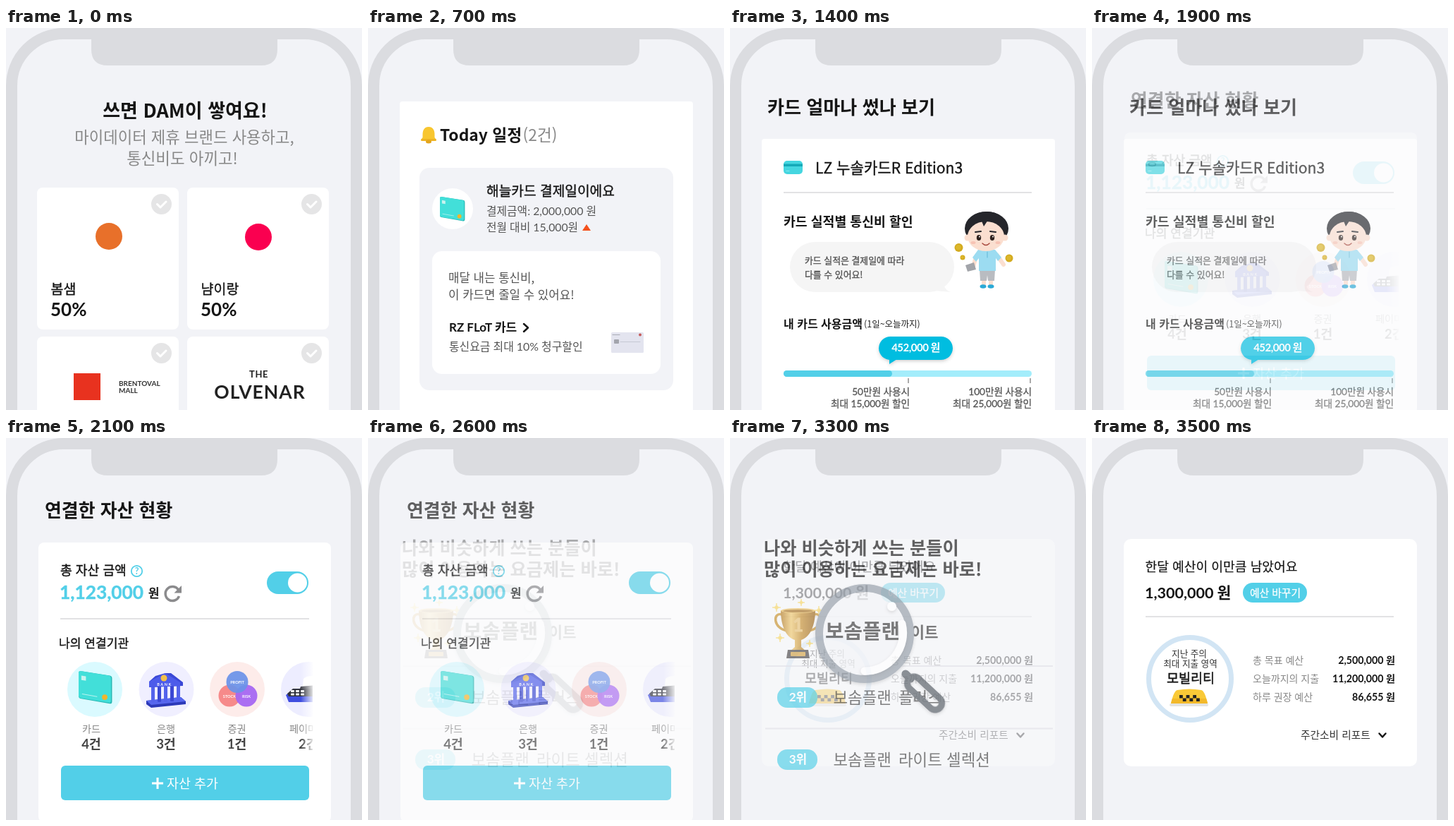
Animation, 505 px wide and 541 px high, one loop 4000 ms. Source, as an HTML page:

```html
<!DOCTYPE html>
<html lang="ko">
<head>
<meta charset="utf-8">
<title>Phone screens</title>
<style>
html, body { margin: 0; width: 100%; height: 100%; overflow: hidden; background: #f2f3f7; }
svg { display: block; width: 100%; height: 100%; }
text { font-family: 'Noto Sans CJK KR', 'Noto Sans CJK JP', 'Noto Sans CJK', sans-serif; white-space: pre; }
.lato { font-family: Lato, 'Noto Sans CJK KR', 'Noto Sans CJK JP', sans-serif; }
</style>
</head>
<body>
<svg id="stage" viewBox="0 0 505 541" xmlns="http://www.w3.org/2000/svg"></svg>
<script>
const BG = '#f2f3f7', CYAN = '#52cfe8', INK = '#151515', GRAY = '#888', DARK = '#555';

// Basic shapes
const rect = (x, y, w, h, r, fill, extra = '') =>
  `<rect x="${x}" y="${y}" width="${w}" height="${h}" rx="${r}" fill="${fill}" ${extra}/>`;
const disc = (x, y, r, fill, extra = '') =>
  `<circle cx="${x}" cy="${y}" r="${r}" fill="${fill}" ${extra}/>`;
const oval = (x, y, rx, ry, fill) =>
  `<ellipse cx="${x}" cy="${y}" rx="${rx}" ry="${ry}" fill="${fill}"/>`;
const path = (d, fill, extra = '') => `<path d="${d}" fill="${fill}" ${extra}/>`;
const line = (d, color, width, cap = 'round') =>
  path(d, 'none', `stroke="${color}" stroke-width="${width}" stroke-linecap="${cap}" stroke-linejoin="round"`);
const rule = (x1, x2, y, color = '#e2e2e4') => rect(x1, y - 1, x2 - x1, 2, 0, color);

// Text: anchor s/m/e, "mid" thickens the regular weight slightly
function text(x, y, str, size, fill = INK, { bold, mid, lato, a = 's', ls = 0 } = {}) {
  const anchor = { s: 'start', m: 'middle', e: 'end' }[a];
  const thick = mid ? ` stroke="${fill}" stroke-width="${mid}"` : '';
  return `<text x="${x}" y="${y}" font-size="${size}" fill="${fill}" text-anchor="${anchor}"` +
    ` font-weight="${bold ? 700 : 400}" letter-spacing="${ls}"${lato ? ' class="lato"' : ''}${thick}>${str}</text>`;
}
const bold = { bold: 1 }, mid = { mid: .35 }, lato = { lato: 1 }, latoBold = { lato: 1, bold: 1 };

const at = (x, y, s, body) => `<g transform="translate(${x} ${y}) scale(${s})">${body}</g>`;

const payCard = (x, y, s) => at(x, y, s,
  path('M2 0L34 5Q36.500 5.300 36.500 8V33Q36.500 36 34 35.500L2 30Q0 29.600 0 27V2Q0 0 2 0Z', '#2ab8b4') +
  path('M2 0L33 5Q35.300 5.300 35.300 8V32Q35.300 35 33 34.500L2 29.500Q0 29 0 27V2Q0 0 2 0Z', '#42dfd9') +
  path('M3 5L8 5.800V10.500L3 9.800Z', '#c9f3ef') +
  line('M4 25L20 27.800', '#b9f3ef', .8) +
  disc(28.500, 28.500, 3, '#f0b52c'));

function shopTile(x, y, name = '') {
  const cx = x + 176.500, cy = y + 23.500;
  let s = rect(x, y, 201, 201, 8, '#fff') + disc(cx, cy, 14.500, '#e5e5e6') +
    line(`M${cx - 6} ${cy}l4.500 4.500l8 -8`, '#fff', 3);
  if (name) s += text(x + 19.500, y + 151, name, 19.500, INK, mid) +
    text(x + 19, y + 182, '50%', 26, INK, latoBold);
  return s;
}

function shops() {
  return text(254, 126.500, '쓰면 DAM이 쌓여요!', 27, INK, { bold: 1, a: 'm' }) +
    text(253, 162.500, '마이데이터 제휴 브랜드 사용하고,', 22.250, GRAY, { a: 'm' }) +
    text(250, 192.500, '통신비도 아끼고!', 22.400, GRAY, { a: 'm' }) +
    shopTile(44, 226, '봄샘') + shopTile(257, 226, '냠이랑') +
    shopTile(44, 437) + shopTile(257, 437) +
    disc(146, 295, 19, '#e8702a') + disc(358, 296, 19, '#fa0050') +
    rect(96, 489, 38, 38, 0, '#e8321f') +
    text(160, 507, 'BRENTOVAL', 10, '#333', latoBold) +
    text(160, 517, 'MALL', 10, '#333', latoBold) +
    text(358.500, 495, 'THE', 13, '#222', { ...latoBold, a: 'm', ls: .5 }) +
    text(360, 525, 'OLVENAR', 26.500, '#222', { ...latoBold, a: 'm', ls: 1 });
}

function schedule() {
  const bell = path('M86 140C79 140 77.500 146 77.500 151V155L75 158.500H97L94.500 155V151C94.500 146 93 140 86 140Z', '#f8c62f') +
    rect(75, 157, 22, 3, 1.500, '#eeb423') + oval(86, 161, 4, 2.500, '#e3a51c');
  return rect(45, 104, 416, 460, 4, '#fff') + bell +
    text(102, 160, 'Today 일정', 22.800, INK, bold) +
    text(219.500, 160, '(2건)', 22.800, GRAY) +
    rect(73, 198, 360, 315, 14, BG) + disc(120, 256, 29, '#fff') + payCard(102, 239, .97) +
    text(168, 238, '해늘카드 결제일이에요', 19.200, INK, mid) +
    text(168, 265, '결제금액: 2,000,000 원', 15.800, DARK, lato) +
    text(168, 288, '전월 대비 15,000원', 15.800, DARK, lato) +
    path('M304 287H316L310 278Z', '#f4511e') +
    rect(91, 316, 324, 174, 14, '#fff') +
    text(114, 360, '매달 내는 통신비,', 16.800, DARK) +
    text(114, 384, '이 카드면 줄일 수 있어요!', 16.800, DARK) +
    text(115, 430, 'RZ FLoT 카드', 17, INK, latoBold) +
    line('M221 419L227 424.500L221 430', INK, 2.500) +
    text(115, 457, '통신요금 최대 10% 청구할인', 15.900, DARK, lato) +
    rect(345, 431, 46, 29, 1.500, '#e3e4ef') + rect(349, 441, 7, 6, 1, '#a3a5ad') +
    line('M347 434.500H357', '#a9abb5', 1.200) + line('M358 444.500H386', '#c6c8d4', 1) +
    disc(386, 434.500, 2, '#c65a5a');
}

function boy() {
  const skin = '#fbdfd0', hair = '#25262b', shirt = '#9cdcf1';
  const coin = (x, y, r) => disc(x, y, r, '#d3ab1f') + disc(x - .5, y - .5, r * .6, '#dcb72c');
  return coin(324.500, 311, 6) + coin(330, 325, 3.500) + coin(396, 326, 5.500) +
    line('M349 324L345 338', skin, 6) + line('M379 322L388 335', skin, 6) +
    line('M360 354V364M370 354V364', skin, 6) +
    oval(359, 366, 4.500, 2.800, '#2ba9d6') + oval(370, 366, 4.500, 2.800, '#2ba9d6') +
    path('M354 342H376L375 358H366L365 350L364 358H355Z', '#b9bcc1') +
    path('M352 314H376L385 325L380 330L377 326V344H353V326L349 331L344 325Z', shirt) +
    line('M365 317V325', '#6bbddb', 1.200) +
    path('M334 336L346 332L349 342L337 345Z', '#a2a4a9') +
    oval(364, 284, 31, 24, hair) +
    disc(337, 297, 4.500, skin) + disc(390, 297, 4.500, skin) +
    oval(363, 295, 26, 21, skin) +
    path('M336 293C337 276 344 271 356 271L360 281L366 272C380 270 390 279 391 294C396 275 384 260 365 260C345 260 331 272 336 293Z', hair) +
    line('M348 289L356 288M369 288L377 289', hair, 2) +
    oval(353, 297, 3.200, 4, '#30231f') + oval(372, 297, 3.200, 4, '#30231f') +
    disc(354, 295.500, 1, '#fff') + disc(373, 295.500, 1, '#fff') +
    oval(345, 304, 3.500, 2, '#f7c3b4') + oval(380, 304, 3.500, 2, '#f7c3b4') +
    line('M358 305Q363 310 368 305', '#a8483d', 1.500);
}

function spending() {
  const goal = (x, y1, y2) => rect(x, 496, 2, 7, 0, '#aaa') +
    text(x + 3, 520, y1, 13.600, DARK, { lato: 1, a: 'e', mid: .3 }) +
    text(x + 3, 537, y2, 13.600, DARK, { lato: 1, a: 'e', mid: .3 });
  return text(53, 122, '카드 얼마나 썼나 보기', 26.100, INK, bold) +
    rect(45, 157, 416, 400, 4, '#fff') +
    rect(76, 188, 27, 19, 5, '#45d6e0') + rect(76, 192.500, 27, 3.500, 0, '#14a9b8') +
    line('M80 202.500H84', '#8ceaf0', 1.200) +
    text(121, 205.500, 'LZ 누솔카드R Edition3', 21.100, INK, mid) +
    rule(76, 428, 233) +
    text(76, 281, '카드 실적별 통신비 할인', 18.300, INK, bold) +
    rect(85, 303, 233, 71, 35.500, '#f5f5f5') + path('M290 372L304 366Q306 371 313 374Z', '#f5f5f5') +
    text(106, 334, '카드 실적은 결제일에 따라', 12.900, DARK, mid) +
    text(106, 354, '다를 수 있어요!', 12.900, DARK, mid) + boy() +
    text(76, 425, '내 카드 사용금액', 16, INK, bold) +
    text(190, 424, '(1일~오늘까지)', 12.500, '#222') +
    `<g filter="url(#soft)">${rect(211, 437, 105, 33, 16.500, '#06bde0')}${path('M226 466V476L237 469Z', '#06bde0')}</g>` +
    text(263.500, 458, '452,000 원', 15, '#fff', { ...latoBold, a: 'm', ls: -.5 }) +
    rect(76, 485, 352, 9, 4.500, '#a3edfb') +
    path('M80.500 485H225.500A4.500 4.500 0 0 1 225.500 494H80.500A4.500 4.500 0 0 1 80.500 485Z', CYAN) +
    goal(252, '50만원 사용시', '최대 15,000원 할인') +
    goal(425, '100만원 사용시', '최대 25,000원 할인');
}

function bank() {
  let s = path('M199 372L248 367L255 373V377L206 382L199 377Z', '#2c39b8') +
    path('M199 372L248 367L255 373L206 378Z', '#5767ee');
  for (let i = 0; i < 5; i++) s += rect(206 + i * 9, 351 - i * .3, 5, 23, 1, i % 2 ? '#3b48d4' : '#5463ec');
  return s + path('M203 345L212 337L226 333H234L251 346V351L203 353Z', '#3a48d6') +
    path('M203 345L226 333L247 346L247 351L203 353Z', '#4d5cea') +
    disc(224, 340, 4.500, '#f2c14a') +
    text(225, 351, 'BANK', 5.500, '#fff', { ...latoBold, a: 'm', ls: 1.500 });
}

function venn() {
  return [[317, 365, '#f58282', 'STOCK'], [341, 365, '#a565f2', 'RISK'], [328, 345.500, '#6a92e8', 'PROFIT']]
    .map(([x, y, c, s]) => disc(x, y, 15.500, c, 'fill-opacity=".93"') +
      text(x, y + 2.500, s, 5.600, '#fff', { ...latoBold, a: 'm' })).join('');
}

function terminal() {
  let s = path('M422 341Q429 335 440 338V362H420Z', '#fff') +
    path('M418 352L440 350V364H414Z', '#42434c') +
    path('M397 364L407 356H440V374H401Z', '#3f4ee0') + path('M399 362L407 355H440V366H401Z', '#30323c');
  for (let i = 0; i < 6; i++) s += rect(404 + i % 3 * 7, 357 + (i > 2) * 4.500, 5, 3, .8, '#f2f2f6');
  return s;
}

function assets() {
  const org = (x, color, art, name, count) => disc(x, 356, 39, color) + art +
    text(x - .5, 417, name, 14.200, GRAY, { a: 'm' }) +
    text(x - .5, 440, count, 18.500, '#444', { ...latoBold, a: 'm' });
  return text(55, 112, '연결한 자산 현황', 25.900, INK, bold) +
    rect(46, 148, 415, 396, 8, '#fff') +
    text(77, 194, '총 자산 금액', 18.200, INK, mid) +
    disc(185.500, 188.500, 7.700, 'none', `stroke="${CYAN}" stroke-width="1.800"`) +
    text(185.500, 193, '?', 12.500, CYAN, { ...latoBold, a: 'm' }) +
    text(76, 228, '1,123,000', 26.300, CYAN, { ...latoBold, mid: .4 }) +
    text(202, 226, '원', 17, INK, { mid: .6 }) +
    line('M244.500 215A10 10 0 1 0 245.500 224', '#8b8b8d', 3.500, 'butt') +
    path('M249 209V219.500H238.500Z', '#8b8b8d') +
    rect(370, 189, 59, 32, 16, CYAN) + disc(413.500, 205, 13.500, '#fff') +
    rule(77, 430, 256) +
    text(75, 297, '나의 연결기관', 17.100, INK, mid) +
    '<g clip-path="url(#list)">' +
    org(126, '#dafaff', payCard(103, 330, 1.300), '', '') +
    text(121, 417, '카드', 14.200, GRAY, { a: 'm' }) +
    text(121, 440, '4건', 18.500, '#444', { ...latoBold, a: 'm' }) +
    org(227.500, '#f0efff', bank(), '은행', '3건') +
    org(328, '#fdecea', venn(), '증권', '1건') +
    org(429, '#ededff', terminal(), '', '') +
    text(402, 417, '페이머니', 14.200, GRAY) + text(415, 440, '2건', 18.500, '#444', latoBold) +
    rect(418, 312, 20, 136, 0, 'url(#fade)') + '</g>' +
    rect(78, 464, 352, 49, 6, CYAN) +
    line('M207 489H223M215 481V497', '#fff', 3, 'butt') +
    text(228, 496, '자산 추가', 18.400, '#fff');
}

function trophy() {
  const star = (x, y, r) => path(`M${x} ${y - r}Q${x} ${y} ${x + r} ${y}Q${x} ${y} ${x} ${y + r}` +
    `Q${x} ${y} ${x - r} ${y}Q${x} ${y} ${x} ${y - r}Z`, '#f7d768', 'stroke="#f7d768" stroke-width=".8"');
  return line('M74 250C60 246 61 270 81 273M119 250C133 246 132 270 112 273', '#c8932f', 3.500) +
    path('M72 244H121C121 268 112 283 101 286V296L108 302H85L92 296V286C81 283 72 268 72 244Z', 'url(#gold)') +
    oval(96.500, 244.500, 24.500, 3.500, '#e9bf62') + oval(96.500, 245, 21, 2, '#a87425') +
    text(96.500, 274, '1', 26, '#e8c277', { ...latoBold, a: 'm', mid: .8 }) +
    path('M82 300H111L113 312H80Z', '#4d4a4a') + rect(86, 303, 21, 6, 1, '#d6a648') +
    star(66, 240, 6) + star(101, 233, 5) + star(126, 244, 6) + star(71, 283, 6) + star(113, 291, 5);
}

function plans() {
  const row = (y, rank, plan) => rect(67, y, 57, 29, 14, CYAN) +
    text(96.500, y + 20, rank, 17, '#fff', { ...latoBold, a: 'm' }) +
    text(146.500, y + 23, '보솜플랜', 22.400, '#444') + text(239, y + 23, plan, 22.400, '#444');
  const lens = disc(191, 277, 64.500, '#f4f5f8', 'stroke="#959ea8" stroke-width="11"');
  const handle = line('M249 334L256 341', '#555b64', 11) +
    `<g transform="translate(276 361.500) rotate(43)">` +
    rect(-30, -9.500, 60, 19, 9.500, 'none', 'stroke="#555b64" stroke-width="9"') + '</g>';
  return text(48, 165, '나와 비슷하게 쓰는 분들이', 25.250, INK, bold) +
    text(48, 194.500, '많이 이용하는 요금제는 바로!', 25.250, INK, bold) +
    rule(50, 458, 323, '#e1e2e7') + rule(50, 458, 411.500, '#e1e2e7') +
    text(237, 283, '라이트', 21.200, '#3c3c3c', bold) +
    row(353, '2위', '플러스') + row(441, '3위', '라이트 셀렉션') + trophy() +
    `<g filter="url(#soft)">${lens}${handle}</g>` +
    text(135, 284, '보솜플랜', 28.800, '#3c3c3c', bold) +
    `<g filter="url(#soft)">${line('M244 263A54 54 0 0 1 191 330', '#fff', 11)}${disc(229.500, 238.500, 6.500, '#fff')}</g>`;
}

function budget() {
  const row = (y, name, sum) => text(228, y, name, 14, GRAY) +
    text(430, y, sum, 14.200, INK, { ...latoBold, a: 'e' });
  let taxi = rect(110, 376, 55, 4, 2, '#e4e4e2') +
    path('M121 357Q138 354 155 357Q160 358 164 376H112Q116 358 121 357Z', '#f9c937') +
    path('M112 376Q113 371 114 369H162Q163 371 164 376Z', '#f3b92a');
  for (let i = 0; i < 12; i++)
    if ((i % 6 + (i > 5)) % 2 === 0) taxi += rect(124 + i % 6 * 4.800, 364 + (i > 5) * 4.500, 4.800, 4.500, 0, '#222');
  return rect(45, 143, 416, 322, 10, '#fff') +
    text(75.500, 189, '한달 예산이 이만큼 남았어요', 18.200, INK, { mid: .2 }) +
    text(75, 227, '1,300,000 원', 21.500, INK, latoBold) +
    rect(214, 205, 91, 28, 14, CYAN) +
    text(260, 225, '예산 바꾸기', 14.800, '#fff', { a: 'm', mid: .25 }) +
    rule(76, 428, 253) +
    disc(139, 341, 58.500, '#fff', 'stroke="#d2e5f4" stroke-width="7"') +
    text(138, 310, '지난 주의', 12.600, '#333', { a: 'm' }) +
    text(139.500, 324, '최대 지출 영역', 12.600, '#333', { a: 'm' }) +
    text(140, 347, '모빌리티', 18.500, INK, { a: 'm', mid: .4 }) + taxi +
    row(320, '총 목표 예산', '2,500,000 원') +
    row(346, '오늘까지의 지출', '11,200,000 원') +
    row(372, '하루 권장 예산', '86,655 원') +
    text(296, 426, '주간소비 리포트', 14.700, '#333') +
    line('M407.500 418.500L412 423.500L416.500 418.500', INK, 2.500);
}

const defs = `<defs>
  <clipPath id="list"><rect x="60" y="300" width="375" height="150"/></clipPath>
  <linearGradient id="fade"><stop offset="0" stop-color="#fff" stop-opacity="0"/><stop offset="1" stop-color="#fff"/></linearGradient>
  <linearGradient id="gold"><stop offset="0" stop-color="#b27a22"/><stop offset=".3" stop-color="#efc971"/><stop offset=".6" stop-color="#c58f32"/><stop offset="1" stop-color="#9a661b"/></linearGradient>
  <filter id="soft" x="-20%" y="-20%" width="140%" height="150%"><feDropShadow dx="0" dy="2" stdDeviation="2" flood-color="#444" flood-opacity=".25"/></filter>
</defs>`;

const phone = rect(8, 8, 489, 700, 74, 'none', 'stroke="#dbdce0" stroke-width="16"') +
  path('M121 8H385V30Q385 53 362 53H144Q121 53 121 30Z', '#dbdce0');

// Later screens lie beneath earlier ones, so the leaving screen stays on top.
const stage = document.getElementById('stage');
stage.innerHTML = defs + [shops, schedule, spending, assets, plans, budget]
  .map(draw => `<g class="scene">${draw()}</g>`).reverse().join('') + phone;
const scenes = [...stage.querySelectorAll('.scene')].reverse();

// Each screen holds 500 ms, then cross-fades in 100 ms steps; the last one cuts back.
const LOOP = 4000, SLOT = 700, HOLD = 500;

function render(ms) {
  const t = ms % LOOP, now = Math.floor(t / SLOT), rest = t % SLOT;
  const mix = rest < HOLD ? 0 : (Math.floor((rest - HOLD) / 100) + 1) / 3;
  scenes.forEach((scene, i) => {
    const alpha = i === now ? 1 - mix : i === now + 1 ? mix : 0;
    scene.style.display = alpha ? '' : 'none';
    scene.style.opacity = alpha;
  });
}

const start = performance.now();
function tick() {
  render(performance.now() - start);
  requestAnimationFrame(tick);
}
tick();
</script>
</body>
</html>
```
